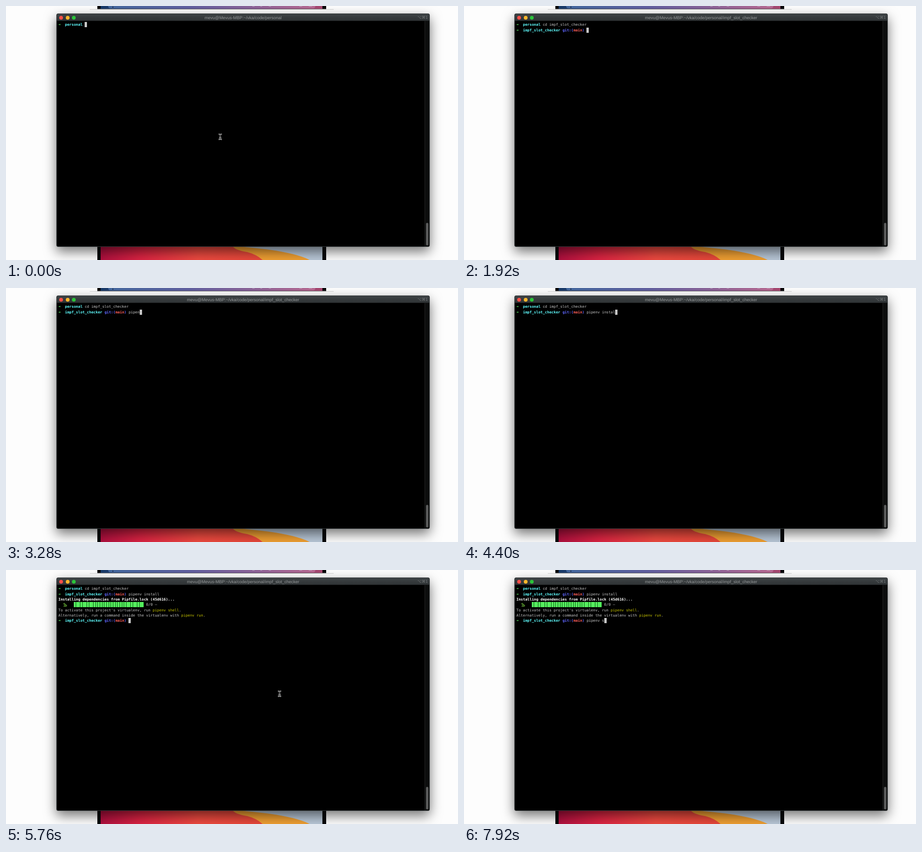
An HTML page for the animation above (8 s loop, 960 px wide and 540 px high).

```html
<!DOCTYPE html>
<html lang="en">
<head>
<meta charset="utf-8">
<title>Terminal session</title>
<style>
  html, body { margin: 0; width: 100%; height: 100%; overflow: hidden; background: #fdfdfd; }
  #stage { position: relative; width: 960px; height: 540px; overflow: hidden; background: #fdfdfd; }
  #stage > svg { position: absolute; left: 0; top: 0; }
  #win {
    position: absolute; left: 107px; top: 16px; width: 793px; height: 496px; box-sizing: border-box;
    border: 1px solid #33383a; border-radius: 4px; background: #000;
    box-shadow: 0 0 1px #0008, 0 10px 26px rgba(0,0,0,.55);
  }
  #bar {
    position: absolute; left: 0; top: 0; right: 0; height: 15px; border-radius: 3px 3px 0 0;
    background: linear-gradient(#3e4345, #2f3335); border-bottom: 1px solid #1b1d1e; box-sizing: border-box;
  }
  #bar i { position: absolute; top: 3.8px; width: 8px; height: 8px; border-radius: 50%; }
  #title, #tab {
    position: absolute; top: 0; line-height: 16px; white-space: pre;
    text-rendering: geometricPrecision; color: #989b9c;
  }
  #title { left: 0; width: 791px; text-align: center; font: 9px/16px "Liberation Sans", Arial, sans-serif; }
  #tab { right: 3px; font: 8px/15px "DejaVu Sans", sans-serif; color: #74787a; }
  #track { position: absolute; right: 0; top: 15px; bottom: 0; width: 9px; background: #0c0d0d; border-left: 1px solid #242626; }
  #thumb { position: absolute; left: 2px; top: 429px; width: 5px; height: 48px; border-radius: 2.5px; background: #5a5b5b; }
  #term {
    position: absolute; left: 111.3px; top: 34.2px; color: #c7c7c7;
    font: 7.74px/11.33px "DejaVu Sans Mono", monospace; text-rendering: geometricPrecision;
  }
  #term div { height: 11.33px; white-space: pre; }
  #term b { color: #fff; }
  #term .g { color: #5ffa68; display: inline-block; width: 1ch; height: 11.33px; vertical-align: top; }
  #term .c { color: #60fdff; }
  #term .b { color: #6066ff; }
  #term .r { color: #ff5f5a; }
  #term .y { color: #c7c400; }
  .cur { display: inline-block; width: 5px; height: 11.3px; background: #c7c7c7; vertical-align: top; }
  .meter {
    display: inline-block; width: 32ch; height: 10.6px; margin-top: .3px; vertical-align: top;
    background: repeating-linear-gradient(90deg, #55ee5e 0 3.9px, #0b5a12 3.9px 4.66px);
  }
  .snake { display: inline-block; width: 2ch; height: 11.33px; vertical-align: top; }
</style>
</head>
<body>
<div id="stage">
  <svg width="960" height="540">
    <defs>
      <linearGradient id="sky">
        <stop offset="0" stop-color="#183a68"/><stop offset=".3" stop-color="#454f92"/>
        <stop offset=".65" stop-color="#70458c"/><stop offset="1" stop-color="#a8486f"/>
      </linearGradient>
      <linearGradient id="dock">
        <stop offset="0" stop-color="#44699f"/><stop offset=".4" stop-color="#62609f"/>
        <stop offset="1" stop-color="#b86a92"/>
      </linearGradient>
      <linearGradient id="dune">
        <stop offset="0" stop-color="#b0103f"/><stop offset=".25" stop-color="#dc2443"/>
        <stop offset=".6" stop-color="#ee4a40"/><stop offset="1" stop-color="#e8483a"/>
      </linearGradient>
    </defs>
    <path d="M178 7.3H696" stroke="#cfcfcf"/>
    <path d="M194 0H680V6.5H194Z" fill="#08080a"/>
    <path d="M201 0H672V6H201Z" fill="url(#sky)"/>
    <path d="M217 0H657Q657 5 652 5H222Q217 5 217 0Z" fill="url(#dock)"/>
    <circle cx="227" cy="2.5" r="1" fill="#0a0a12"/>
    <path d="M523 0h5m12 0h4m14 0h5m60 0h6m14 0h7" stroke="#e6dcea"/>
    <path d="M194 500H680V540H194Z" fill="#08080a"/>
    <path d="M201 500H672V540H201Z" fill="#b9c8d8"/>
    <path d="M201 500H470L503 512Q610 521 645 540H201Z" fill="#f0a033"/>
    <path d="M201 500H470L482 512Q490 520 512 523Q532 528 545 540H201Z" fill="url(#dune)"/>
  </svg>
  <div id="win">
    <div id="bar">
      <i style="left:5.3px;background:#fb4f48"></i>
      <i style="left:18.6px;background:#fdb72b"></i>
      <i style="left:32px;background:#2bc43a"></i>
      <span id="title"></span><span id="tab">⌥⌘1</span>
    </div>
    <div id="track"><div id="thumb"></div></div>
  </div>
  <div id="term"></div>
  <svg id="mouse" width="14" height="18" viewBox="-7 -9 14 18" fill="none">
    <path id="beam" d="M-3.2 -5.5Q0 -5.5 0 -3V3Q0 5.5 -3.2 5.5M3.2 -5.5Q0 -5.5 0 -3V3Q0 5.5 3.2 5.5M-1.8 1.5H1.8" stroke="#e4e4e4" stroke-width="2.2"/>
    <use href="#beam"/>
    <path d="M-3 -5.5Q0 -5.5 0 -3V3Q0 5.5 -3 5.5M3 -5.5Q0 -5.5 0 -3V3Q0 5.5 3 5.5" stroke="#111" stroke-width=".9"/>
  </svg>
</div>
<script>
const LOOP = 8000, STEP = 80;
const el = id => document.getElementById(id);
const HOME = 'mevu@Mevus-MBP:~/vka/code/personal', REPO = 'impf_slot_checker';
const span = (c, s) => `<b class="${c}">${s}</b>`;
const yellow = s => `<span class="y">${s}</span>`;
const cursor = '<span class="cur"></span>';
const prompt = dir => span('g', '➜') + '  ' + span('c', dir) + ' ';
const repoPrompt = prompt(REPO) + span('b', 'git:(') + span('r', 'main') + span('b', ')') + ' ';
const snake = '<svg class="snake" viewBox="0 0 9.3 11.3"><path d="M1 4.2Q3 2 4.2 4T3 6.2Q3 7.6 5.5 6.6T7.5 8.6Q4 10.2 1.8 8.8" ' +
  'fill="none" stroke="#5c9c32" stroke-width="1.5" stroke-linecap="round"/></svg>';

// Key press times for each command
const cdKeys = [720, 800, 880, 1040, 1120];
const installKeys = [2800, 2880, 3040, 3200, 3280, 3360, 3520, 3680, 3760, 3920, 4000, 4160, 4400, 4480];
const shellKeys = [6960, 7040, 7200, 7280, 7440, 7520, 7680, 7840];
const typed = (s, keys, t) => s.slice(0, keys.filter(k => k <= t).length);

function lines(t) {
  const cd = t < 1360 ? typed('cd im', cdKeys, t) : 'cd ' + REPO + (t < 1600 ? '/' : '');
  const out = [prompt('personal') + cd];
  if (t >= 1600) out.push(t < 1680 ? '' : repoPrompt + typed('pipenv install', installKeys, t));
  if (t >= 4720) out.push(t < 5120 ? '' : '<b>Installing dependencies from Pipfile.lock (45d616)...</b>');
  if (t >= 5120) out.push(t < 5280 ? '' : `  ${snake}   <span class="meter"></span> 0/0 —`);
  if (t >= 5520) out.push(
    `To activate this project's virtualenv, run ${yellow('pipenv shell')}.`,
    `Alternatively, run a command inside the virtualenv with ${yellow('pipenv run')}.`,
    t < 5600 ? '' : repoPrompt + typed('pipenv shell', shellKeys, t));
  out[out.length - 1] += cursor;
  return out.map(s => `<div>${s}</div>`).join('');
}

let shown = -1;
function draw(now) {
  const t = Math.floor(now % LOOP / STEP) * STEP;
  if (t !== shown) {
    shown = t;
    el('term').innerHTML = lines(t);
    el('title').textContent = HOME + (t < 1680 ? '' : '/' + REPO);
    const early = t < 720, [x, y] = early ? [455, 277.5] : [581, 262.5];
    const mouse = el('mouse').style;
    mouse.display = early || (t >= 5120 && t < 6960) ? 'block' : 'none';
    mouse.left = x - 7 + 'px';
    mouse.top = y - 9 + 'px';
  }
  requestAnimationFrame(draw);
}
draw(performance.now());
</script>
</body>
</html>
```
